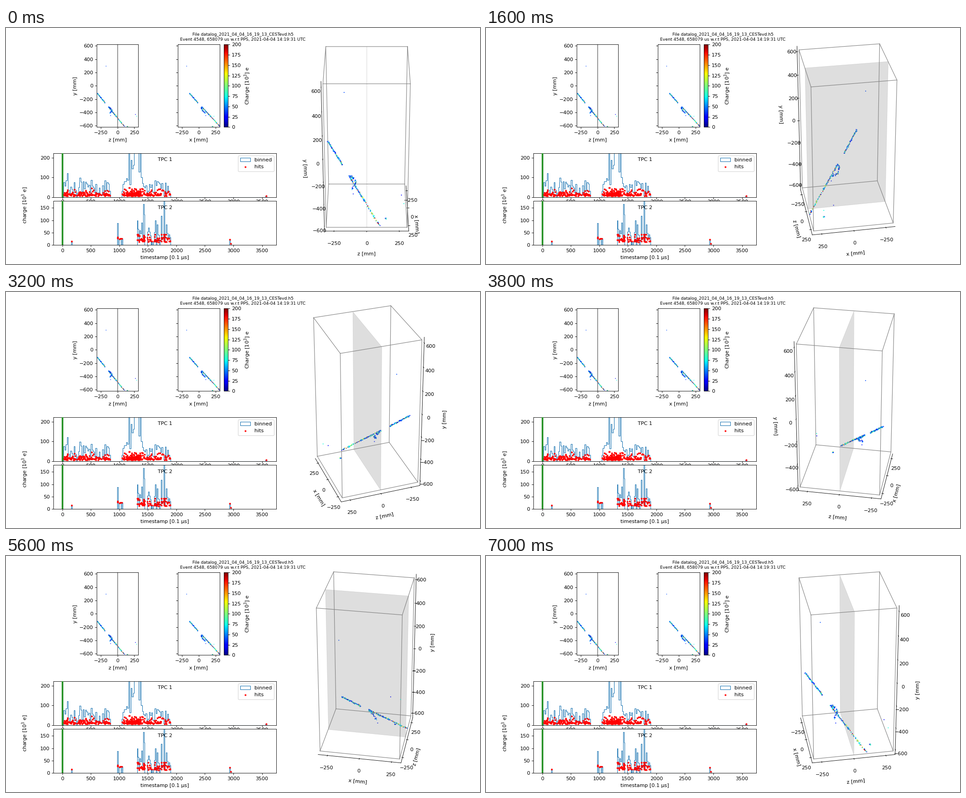
Write a matplotlib script that moves like this. It is 1040 px wide and 520 px high and loops after 7.2 s.

```python
import itertools

import matplotlib.pyplot as plt
import numpy as np
from matplotlib.animation import FuncAnimation
from mpl_toolkits.mplot3d.art3d import Poly3DCollection

W, H, DPI = 1040, 520, 80
FRAMES, INTERVAL = 36, 200
HALF_X, HALF_Y, HALF_Z = 310, 620, 310
SIDE_TICKS, TALL_TICKS = [-250, 0, 250], range(-600, 601, 200)
JET = dict(cmap="jet", vmin=0, vmax=200, s=1)

plt.rcParams.update({"font.family": "DejaVu Sans", "font.size": 10})
rng = np.random.default_rng(4548)
fig = plt.figure(figsize=(W / DPI, H / DPI), dpi=DPI, facecolor="white")


def box(left, top, right, bottom):
    """Figure rectangle from pixel edges measured from the top left."""
    return [left / W, 1 - bottom / H, (right - left) / W, (bottom - top) / H]


# ---- hits in space: columns x, y, z, charge ----
def segment(start, end, count, mean, spread=2.5):
    t = np.sort(rng.random(count))[:, None]
    points = np.array(start) + t * (np.array(end) - np.array(start))
    points += rng.normal(0, spread, points.shape)
    charge = np.clip(rng.gamma(2.5, mean / 2.5, count), 15, 185)
    return np.column_stack([points, charge])


def make_hits():
    track_in, gap_in, gap_out = (-138, -112, -303), (-8, -258, -184), (45, -316, -138)
    crossing, track_out = (190, -472, -8), (310, -605, 100)
    fork, bend, tip = (36, -322, -122), (54, -370, -82), (94, -410, -112)
    lone = [(-178, 295, -172, 40), (148, -430, 268, 22),
            (226, -457, 285, 75), (105, -447, -104, 30)]
    return np.vstack([
        segment(track_in, gap_in, 100, 66),
        segment(gap_out, crossing, 95, 66),
        segment(crossing, track_out, 48, 105),
        segment(fork, bend, 28, 52, 4),
        segment(bend, tip, 22, 52, 4),
        segment((200, -608, 143), (212, -613, 154), 8, 105),
        lone,
    ])


x, y, z, charge = make_hits().T

# ---- projections ----
fig.suptitle("File datalog_2021_04_04_16_19_13_CESTevd.h5\n"
             "Event 4548, 658079 us w.r.t PPS, 2021-04-04 14:19:31 UTC",
             fontsize="small")

ax_zy = fig.add_axes(box(199.3, 36.4, 290.2, 218.4))
ax_zy.axvline(0, color="gray", lw=1.5)
ax_zy.scatter(z, y, c=charge, linewidths=0.4, **JET)
ax_zy.set(xlim=(-HALF_Z, HALF_Z), ylim=(-HALF_Y, HALF_Y),
          xlabel="z [mm]", ylabel="y [mm]")

ax_xy = fig.add_axes(box(376.8, 36.4, 468.8, 218.4), sharey=ax_zy)
dots = ax_xy.scatter(x, y, c=charge, linewidths=0.4, **JET)
ax_xy.set(xlim=(-HALF_X, HALF_X), xlabel="x [mm]")
ax_xy.tick_params(labelleft=False)
for ax in (ax_zy, ax_xy):
    ax.set(xticks=SIDE_TICKS, yticks=TALL_TICKS)

bar = fig.colorbar(dots, cax=fig.add_axes(box(478.4, 36.4, 487.3, 218.4)))
bar.set_ticks(range(0, 201, 25))
bar.set_label("Charge [$10^3$] e")


# ---- charge against time; the histogram sums the hits ----
def cloud(times, low, mean, high):
    values = low + rng.gamma(1.5, (mean - low) / 1.5, len(times))
    return np.column_stack([times, np.clip(values, low, high)])


def draw_tpc(ax, name, hits, bins, top, y_step):
    times, charges = hits.T
    ax.hist(times, bins=bins, weights=charges, histtype="step",
            color="C0", label="binned")
    ax.plot(times, charges, "r.", ms=5, label="hits")
    ax.axvline(4, color="#229022", lw=3.2, zorder=3)
    ax.text(0.5, 0.82, name, ha="center", transform=ax.transAxes)
    ax.set(xlim=(-156, 3751), ylim=(0, top), xticks=range(0, 3501, 500),
           yticks=range(0, top, y_step))


hits_one = np.vstack([cloud(rng.uniform(20, 835, 125), 6, 17, 45),
                      cloud(rng.uniform(1045, 1900, 125), 6, 17, 42),
                      cloud(rng.triangular(1080, 1370, 1400, 88), 7, 19, 48),
                      [(3573, 8)]])
hits_two = np.vstack([cloud(rng.uniform(1310, 1450, 22), 12, 23, 42),
                      cloud(rng.uniform(1490, 1890, 52), 12, 26, 42),
                      cloud(np.full(5, 1422), 15, 28, 42),
                      cloud(np.full(3, 972), 26, 31, 34),
                      cloud(np.linspace(1000, 1043, 3), 24, 25, 26),
                      [(160, 15), (2935, 23), (2952, 6)]])

ax_one = fig.add_axes(box(104, 275.9, 593.1, 373))
draw_tpc(ax_one, "TPC 1", hits_one, np.arange(20, 3601, 20), 222, 100)
ax_one.tick_params(axis="x", pad=1)
ax_one.legend(loc="upper right")

ax_two = fig.add_axes(box(104, 381.4, 593.1, 478.4))
draw_tpc(ax_two, "TPC 2", hits_two, np.arange(5, 3000, 15), 177, 50)
ax_two.set_xlabel("timestamp [0.1 µs]")
fig.text(41.5 / W, 1 - 390 / H, "charge [$10^3$ e]", rotation=90,
         ha="center", va="center")

# ---- rotating detector; the vertical axis holds y ----
ax_3d = fig.add_axes(box(564.3, 26, 1006.3, 468), projection="3d")
ax_3d.patch.set_visible(False)
ax_3d.set_box_aspect((1, 1, 2))
margin = 25 / 24
ax_3d.set_xlim(-HALF_X * margin, HALF_X * margin)
ax_3d.set_ylim(-HALF_Z * margin, HALF_Z * margin)
ax_3d.set_zlim(-HALF_Y * margin, HALF_Y * margin)
ax_3d.set(xlabel="x [mm]", ylabel="z [mm]",
          xticks=SIDE_TICKS, yticks=SIDE_TICKS, zticks=TALL_TICKS)
ax_3d.set_zlabel("y [mm]", labelpad=20)
ax_3d.grid(False)
for axis in (ax_3d.xaxis, ax_3d.yaxis, ax_3d.zaxis):
    axis.pane.set_visible(False)

corners = itertools.product((-HALF_X, HALF_X), (-HALF_Z, HALF_Z), (-HALF_Y, HALF_Y))
for a, b in itertools.combinations(corners, 2):
    if sum(p != q for p, q in zip(a, b)) == 1:
        ax_3d.plot(*zip(a, b), color="gray", lw=1)

cathode = [(-HALF_X, 0, -HALF_Y), (HALF_X, 0, -HALF_Y),
           (HALF_X, 0, HALF_Y), (-HALF_X, 0, HALF_Y)]
translucent = (0.5, 0.5, 0.5, 0.26)
ax_3d.add_collection3d(Poly3DCollection(
    [cathode], facecolors=[translucent], edgecolors=[translucent], linewidths=0.6))
ax_3d.scatter(x, z, y, c=charge, depthshade=False, linewidths=0.8, **JET)


def update(frame):
    # The tiny offset settles which side the axes take at right angles.
    ax_3d.view_init(elev=30, azim=360 / FRAMES * frame + 1e-4)
    return []


anim = FuncAnimation(fig, update, frames=FRAMES, interval=INTERVAL,
                     init_func=lambda: update(0), repeat=True, repeat_delay=0)
plt.show()
```
